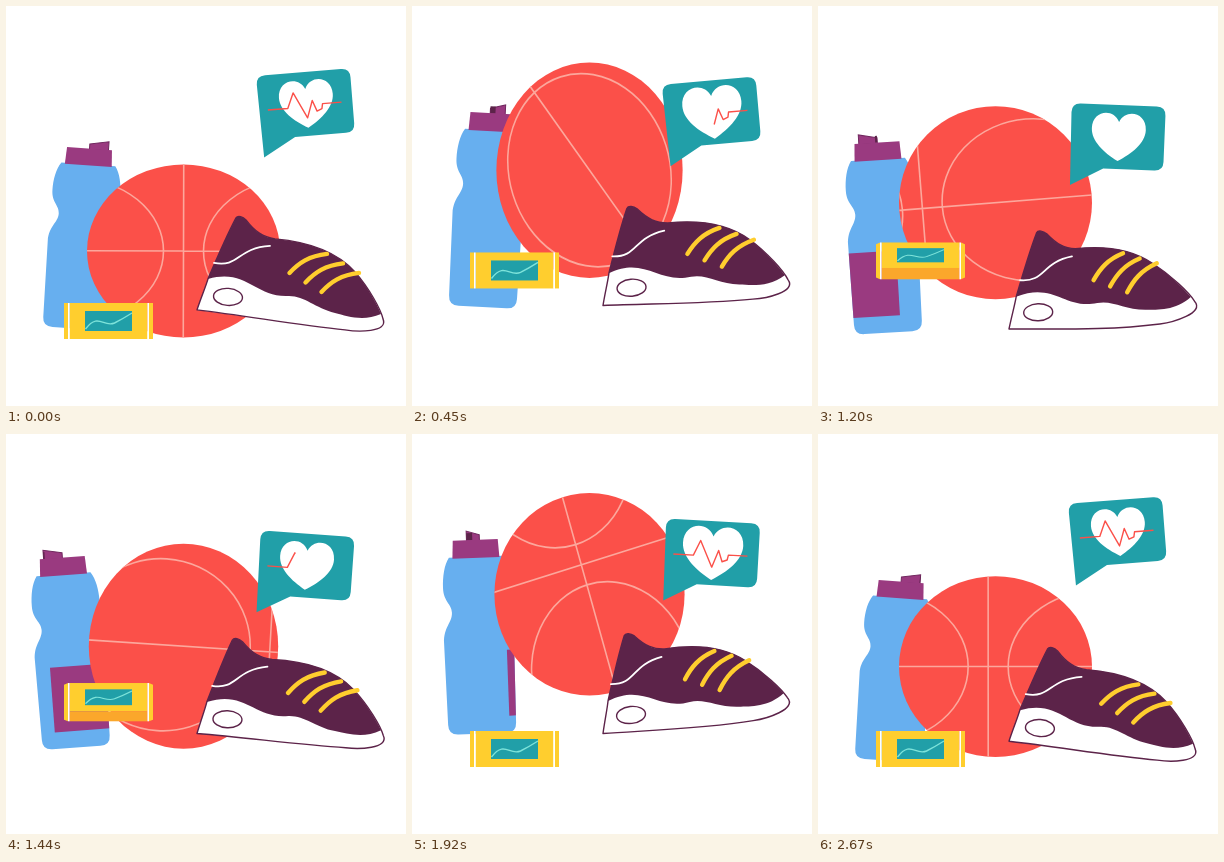
Write an HTML page with a canvas that moves like this. It is 400 by 400 pixels and loops after 2700 ms.

```html
<!DOCTYPE html>
<html lang="en">
<head>
<meta charset="utf-8">
<title>Sport kit</title>
<style>
html, body { margin: 0; width: 100%; height: 100%; overflow: hidden; background: #fff; }
canvas { display: block; }
</style>
</head>
<body>
<canvas id="stage" width="400" height="400"></canvas>
<script>
const ctx = document.getElementById('stage').getContext('2d');
const LOOP = 2700, HOP = LOOP / 2, FRAME = 30, TAU = Math.PI * 2, DEG = Math.PI / 180;
const RED = '#fb5049', SEAM = '#fca79c', TEAL = '#219fa8', YELLOW = '#ffce2e', ORANGE = '#fba72b',
  BLUE = '#67afef', PURPLE = '#9a3a80', DARK = '#5c2349', WHITE = '#fff';

// Timing helpers, in ms
const clamp = u => Math.max(0, Math.min(1, u));
const smooth = u => (u = clamp(u), u * u * (3 - 2 * u));
const wave = (t, shift) => Math.cos(TAU * (t - shift) / LOOP);
const distance = (x, center, period) => {
  const d = Math.abs(x - center) % period;
  return Math.min(d, period - d);
};
const pulse = (x, center, reach, period = HOP) =>
  Math.cos(clamp(distance(x, center, period) / reach) * Math.PI / 2) ** 2;
// Height of a bounce: 0 on landing, 1 halfway between landings
const bounce = (hop, landing) => {
  const v = distance(hop, landing, HOP) / (HOP / 2);
  return .8 * (1 - (1 - v) ** 4) + .2 * v;
};

const BODY = new Path2D('M-27-177C-32-170-34-158-34-147C-34-133-26-131-26-122C-26-112-35-108-35-92L-34-10' +
  'Q-34 0-24 0H24Q34 0 34-10L35-92C35-108 26-112 26-122C26-131 34-133 34-147C34-158 32-170 27-177Z');
const BUBBLE = new Path2D('M-38-32H38Q47-32 47-23V23Q47 32 38 32H-13L-45.5 50L-47-23Q-47-32-38-32Z');
const HEART = new Path2D('M1 24C-13 16-26 5-26-8C-26-26-5-29 1-15C7-29 28-26 28-8C28 5 15 16 1 24Z');
const HEARTBEAT = [[-38, 3], [-18, 3], [-11.5, -12], [1, 14], [7, -3], [11, 8], [16, 6], [17, 1], [36, 1]];

// Shoe curves start with a point, followed by Bezier triples, measured from the heel
const INSTEP = [11, -31, 20, -52, 30, -75, 39, -92, 41, -95, 46, -93, 49, -90, 58, -78, 66, -73, 78, -71,
  112, -68, 140, -58, 158, -38];
const SHOE = [0, 0, 4, -12, 9, -24, ...INSTEP, 172, -22, 184, 0, 186, 9, 192, 23, 160, 22, 148, 20,
  100, 15, 50, 6, 0, 0];
const UPPER = [...INSTEP, 170, -24, 179, -8, 184, 4, 166, 12, 150, 6, 138, 3, 118, -2, 108, -14, 92, -14,
  58, -12, 50, -42, 11, -31];
const COLLAR = [17, -47, 42, -42, 40, -62, 73, -64];
const LACE = [92.5, -37, 102, -47, 112, -54, 130, -56];

function group(x, y, turn, draw) {
  ctx.save();
  ctx.translate(x, y);
  ctx.rotate(turn);
  draw();
  ctx.restore();
}
function fill(color, path) {
  ctx.fillStyle = color;
  path ? ctx.fill(path) : ctx.fill();
}
function stroke(color, width) {
  ctx.strokeStyle = color;
  ctx.lineWidth = width;
  ctx.stroke();
}
function box(color, x, y, w, h) {
  ctx.fillStyle = color;
  ctx.fillRect(x, y, w, h);
}
function poly(color, points) {
  ctx.beginPath();
  points.forEach(p => ctx.lineTo(...p));
  ctx.closePath();
  fill(color);
}

function drawBottle(t, hop) {
  group(70.5, 336.5 - 37 * bounce(hop, 1260), 4.3 * DEG * wave(t, 120), () => {
    ctx.scale(1, 1 - .075 * pulse(hop, 1320, 180));
    fill(BLUE, BODY);
    ctx.save();
    ctx.clip(BODY);
    box(PURPLE, .1 * t - 164.5, -83, 57, 66);
    ctx.restore();

    // The spout turns with the bottle and shows whichever end faces forward
    const side = wave(t, 0), outer = Math.sign(side), half = 5.5 + 4 * Math.abs(side), mid = 9.5 * side;
    const end = t < HOP ? -outer : outer, depth = 6 * Math.sqrt(1 - side * side);
    poly(PURPLE, [[mid - outer * half, -199], [mid + outer * half, -203],
      [mid + outer * half, -193], [mid - outer * half, -193]]);
    stroke('#71285f', 1);
    box(DARK, mid + end * (half - depth / 2) - depth / 2, -201, depth, 7);
    poly(PURPLE, [[-22.5, -194], [22.5, -194], [23.5, -176], [-23.5, -176]]);
  });
}

function drawBall(t, hop) {
  const turn = Math.PI * (smooth((hop + 22) / HOP) + (t < HOP ? 0 : 1));
  const gap = 220, roll = 3 * gap * t / LOOP % gap;
  const stretch = 28 * Math.sin(Math.PI * clamp(hop / 640)), squash = 20 * pulse(hop, 0, 70);
  group(177.5, 245 - 87.5 * bounce(hop, 0), 0, () => {
    ctx.scale(1 - .3 * stretch / 193, 1 + (stretch - squash) / 193);
    ctx.beginPath();
    ctx.arc(0, 0, 96.5, 0, TAU);
    fill(RED);
    ctx.clip();
    ctx.rotate(turn);
    ctx.beginPath();
    ctx.moveTo(-100, 0);
    ctx.lineTo(100, 0);
    for (let x = roll - 2 * gap; x <= gap; x += gap) {
      ctx.moveTo(x, -100);
      ctx.lineTo(x, 100);
      ctx.moveTo(x + gap / 2 + 90, 0);
      ctx.ellipse(x + gap / 2, 0, 90, 81, 0, 0, TAU);
    }
    stroke(SEAM, 1.6);
  });
}

function drawBar(t) {
  const lift = clamp(1 - Math.abs((t - 920) / 900) ** 2.4);
  const tilt = .8 * pulse(t, 1260, 650, LOOP), face = 36 * Math.cos(tilt), edge = 16 * Math.sin(tilt);
  group(102.5, 315 - 64 * lift, 0, () => {
    const top = -(face + edge) / 2, bottom = -top, pinch = edge / 6;
    box(YELLOW, -39, top, 78, face);
    box(ORANGE, -39, top + face, 78, edge);
    for (const s of [-1, 1]) {
      poly(YELLOW, [[s * 44.5, top + pinch], [s * 40.5, top], [s * 40.5, bottom], [s * 44.5, bottom - pinch]]);
      box(WHITE, s * 39.7 - .8, top, 1.6, face + edge);
    }
    ctx.translate(0, top + face / 2);
    ctx.scale(1, face / 36);
    box(TEAL, -23.5, -10, 47, 20);
    ctx.beginPath();
    ctx.moveTo(-23, 8);
    ctx.bezierCurveTo(-10, -9, -5, 7, 6, 2);
    ctx.quadraticCurveTo(14, -2, 23.5, -8);
    stroke('#7de3da', 1.4);
  });
}

// The toe lifts slowly, the heel follows, then the sole slaps down
function drawShoe(hop) {
  const held = 1 - smooth((hop - 1060) / 285);
  const turn = -13.6 * DEG * held * (1 - (1 - clamp(hop / 1050)) ** 2);
  const bend = 28 * held * smooth((hop - 200) / 900);
  const c = Math.cos(turn), s = Math.sin(turn);
  const warp = (x, y) => {
    const u = Math.max(0, (x - 60) / 127), lean = 2 * bend * u / 127 * (y - 10);
    return [x * c - y * s + lean, x * s + y * c - bend * u * u];
  };
  const trace = (p, dx = 0, dy = 0) => {
    const at = i => warp(p[i] + dx, p[i + 1] + dy);
    ctx.beginPath();
    ctx.moveTo(...at(0));
    for (let i = 2; i < p.length; i += 6) ctx.bezierCurveTo(...at(i), ...at(i + 2), ...at(i + 4));
  };
  group(191, 299.5 + 30 * pulse(hop, 1095, 340), 0, () => {
    ctx.lineCap = ctx.lineJoin = 'round';
    trace(SHOE);
    fill(WHITE);
    stroke(DARK, 1.4);
    trace(UPPER);
    fill(DARK);
    trace(COLLAR);
    stroke(WHITE, 1.8);
    for (let i = 0; i < 3; i++) {
      trace(LACE, 16 * i, 9.5 * i);
      stroke(YELLOW, 4.4);
    }
    ctx.beginPath();
    ctx.ellipse(...warp(31, -13), 14.5, 8.5, turn + .08, 0, TAU);
    stroke(DARK, 1.4);
  });
}

// Strokes the part of a polyline between two fractions of its length
function trimmed(points, from, to) {
  const lengths = points.slice(1).map((p, i) => Math.hypot(p[0] - points[i][0], p[1] - points[i][1]));
  const total = lengths.reduce((a, b) => a + b);
  let done = 0;
  ctx.beginPath();
  lengths.forEach((len, i) => {
    const a = clamp((from * total - done) / len), b = clamp((to * total - done) / len);
    const [x, y] = points[i], dx = points[i + 1][0] - x, dy = points[i + 1][1] - y;
    if (b > a) {
      ctx.lineTo(x + dx * a, y + dy * a);
      ctx.lineTo(x + dx * b, y + dy * b);
    }
    done += len;
  });
  stroke(RED, 1.4);
}

function drawBubble(t, hop) {
  group(299.5, 115 - 17 * wave(t, 0), -DEG * (.5 + 5 * wave(t, 260)), () => {
    fill(TEAL, BUBBLE);
    const beat = 1 + .13 * pulse(hop, 525, 225);
    ctx.save();
    ctx.scale(beat, beat);
    fill(WHITE, HEART);
    ctx.restore();
    ctx.lineJoin = 'round';
    const erased = smooth((t - 100) / 665), drawn = smooth((t - 1200) / 660);
    if (t < 1000) trimmed(HEARTBEAT, erased, 1);
    else trimmed(HEARTBEAT, 0, drawn);
  });
}

function tick() {
  const t = Math.floor(performance.now() % LOOP / FRAME) * FRAME, hop = t % HOP;
  ctx.clearRect(0, 0, 400, 400);
  drawBottle(t, hop);
  drawBall(t, hop);
  drawBar(t);
  drawShoe(hop);
  drawBubble(t, hop);
  requestAnimationFrame(tick);
}
tick();
</script>
</body>
</html>
```
